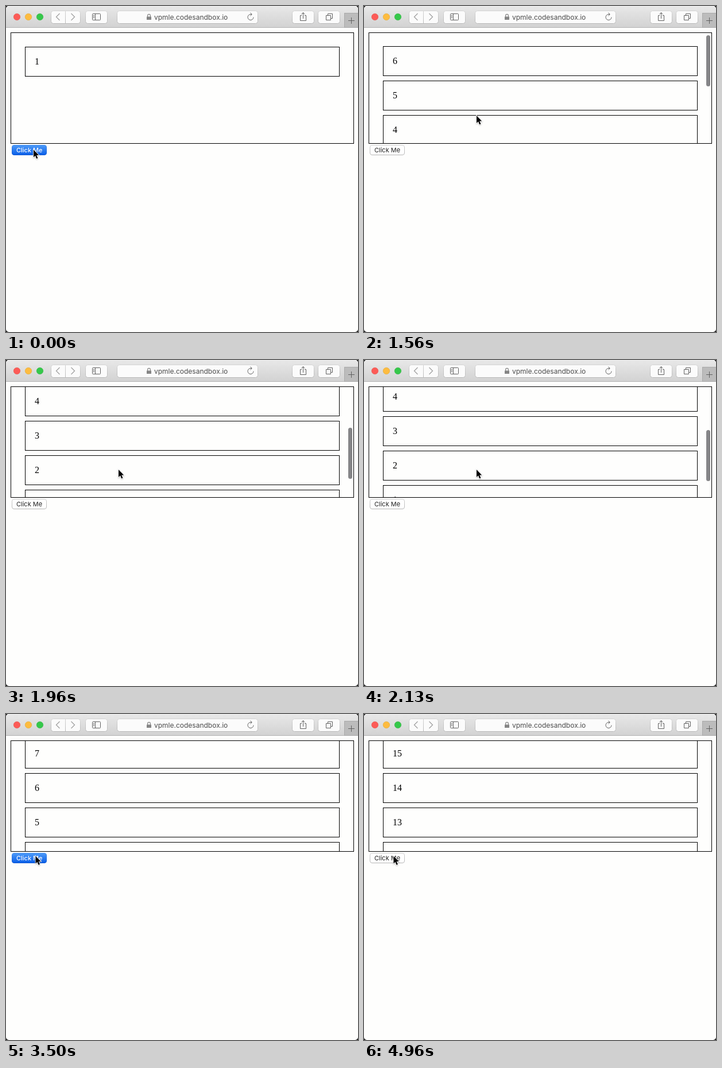
These frames come from a looping animation (613 by 568 pixels, 5.66 s). An HTML page:

```html
<!DOCTYPE html>
<html lang="en">
<head>
<meta charset="utf-8">
<title>Prepending list items</title>
<style>
  html, body { margin: 0; width: 100%; height: 100%; overflow: hidden; background: #111; }
  svg { display: block; width: 613px; height: 568px; }
  .ui { font-family: Inter, sans-serif; }
  .tool { fill: #fbfbfb; stroke: url(#toolEdge); }
  .icon { fill: none; stroke: #606060; }
  .line { fill: none; stroke: #000; }
  #items { font: 16px "Liberation Serif", serif; }
  #button rect { fill: #fff; stroke: url(#buttonEdge); }
  #button text { font-size: 11px; fill: #222; }
  #button.down rect { fill: url(#blue); stroke: url(#blueEdge); }
  #button.down text { fill: #fff; font-weight: 500; }
  #cursor { filter: drop-shadow(0 1px 1px #0004); }
</style>
</head>
<body>
<svg viewBox="0 0 613 568">
  <defs>
    <linearGradient id="bar" x2="0" y2="1">
      <stop stop-color="#e8e8e8"/><stop offset="1" stop-color="#d2d2d2"/>
    </linearGradient>
    <linearGradient id="toolEdge" gradientUnits="userSpaceOnUse" x1="0" x2="0" y1="8" y2="31">
      <stop stop-color="#d4d4d4"/><stop offset="1" stop-color="#b8b8b8"/>
    </linearGradient>
    <linearGradient id="buttonEdge" x2="0" y2="1">
      <stop stop-color="#d0d0d0"/><stop offset="1" stop-color="#b6b6b6"/>
    </linearGradient>
    <linearGradient id="blue" x2="0" y2="1">
      <stop stop-color="#4d9af8"/><stop offset="1" stop-color="#0b5fe8"/>
    </linearGradient>
    <linearGradient id="blueEdge" x2="0" y2="1">
      <stop stop-color="#4390f2"/><stop offset="1" stop-color="#0a55d4"/>
    </linearGradient>
    <clipPath id="window"><rect width="613" height="568" rx="5"/></clipPath>
    <clipPath id="view"><rect x="9" y="47" width="596" height="192"/></clipPath>
  </defs>

  <g clip-path="url(#window)">
    <rect width="613" height="568" fill="#fefefd"/>
    <rect width="613" height="38" fill="url(#bar)"/>
    <path d="M0 .5H613" stroke="#f2f2f2"/>
    <path d="M0 37.5H613" stroke="#b4b4b4"/>
    <rect x="589" y="12" width="24" height="26" fill="#bcbcbc"/>
    <path d="M589.5 12V38M589 12.5H613M589 37.5H613" stroke="#a9a9a9"/>
    <path class="icon" d="M596 25.5H607M601.5 20V31"/>

    <circle cx="19" cy="19" r="5.75" fill="#fc5b57" stroke="#e2463f" stroke-width=".5"/>
    <circle cx="39" cy="19" r="5.75" fill="#fdbc40" stroke="#dfa023" stroke-width=".5"/>
    <circle cx="59" cy="19" r="5.75" fill="#36c84b" stroke="#27aa35" stroke-width=".5"/>

    <g class="tool">
      <rect x="78.5" y="8.5" width="51" height="22" rx="4"/>
      <path d="M103.5 8V31"/>
      <rect x="138.5" y="8.5" width="38" height="22" rx="4"/>
      <rect x="193.5" y="8.5" width="245" height="22" rx="4"/>
      <rect x="498.5" y="8.5" width="38" height="22" rx="4"/>
      <rect x="543.5" y="8.5" width="38" height="22" rx="4"/>
    </g>
    <path class="icon" style="stroke:#a2a2a2" stroke-width="1.3" d="M93.5 13 87.5 19 93.5 25M113.5 13 119.5 19 113.5 25"/>
    <g class="icon">
      <rect x="150.5" y="13.5" width="14" height="11" rx="1"/>
      <path d="M155.5 13.5V24.5M152 16.5H154M152 18.5H154M152 20.5H154"/>
      <path d="M515 16.5H512.5V25.5H522.5V16.5H520M517.5 22V11.5M514.5 14.5 517.5 11.5 520.5 14.5"/>
      <path d="M557.5 16.5H565.5V24.5H557.5ZM560.5 16V13.5H568.5V21.5H566"/>
      <path d="M431 19.5A5 5 0 1 1 426 14.5H428M425.5 11.8 428.3 14.5 425.5 17.2"/>
    </g>
    <path d="M245 18.5H253V24H245Z" fill="#858585"/>
    <path d="M246.6 19V16.8A2.4 2.4 0 0 1 251.4 16.8V19" fill="none" stroke="#858585" stroke-width="1.2"/>
    <text class="ui" x="258" y="24" font-size="12" fill="#4c4c4c">vpmle.codesandbox.io</text>

    <g clip-path="url(#view)">
      <g id="items"></g>
      <rect id="thumb" x="596" width="7" rx="3.5" fill="#868688"/>
    </g>
    <rect class="line" x="8.5" y="46.5" width="597" height="193"/>

    <g id="button" class="ui">
      <rect x="10.5" y="242.5" width="60" height="17" rx="3.5"/>
      <text x="18" y="255">Click Me</text>
    </g>
    <path id="cursor" d="M0 0V13L3 10.2 5.2 15.5 7.4 14.5 5.2 9.5H9.2Z" stroke="#fff" stroke-width="1.6" paint-order="stroke"/>
  </g>
</svg>

<script>
const LOOP = 5660, MAX_ITEMS = 17, PITCH = 60;
const [items, thumb, button, cursor] =
  ["items", "thumb", "button", "cursor"].map(id => document.getElementById(id));

// Runs of clicks; each release prepends an item
const clicks = [
  { start: 0, times: 1, period: 200, hold: 130 },
  { start: 300, times: 4, period: 200, hold: 100 },
  { start: 2900, times: 7, period: 200, hold: 100 },
  { start: 4300, times: 2, period: 160, hold: 100 },
  { start: 4700, times: 2, period: 170, hold: 90 }
].flatMap(({ start, times, period, hold }) =>
  Array.from({ length: times }, (_, i) => {
    const down = start + i * period;
    return { down, up: down + hold };
  }));

const progress = (t, from, to) => Math.min(1, Math.max(0, (t - from) / (to - from)));
// Quick start, long soft landing
const ease = p => 1 - (1 - p) ** 3 * (1 + 3 * p);

items.innerHTML = Array.from({ length: MAX_ITEMS }, (_, i) => `
  <g transform="translate(33 ${71 + i * PITCH})">
    <rect class="line" x=".5" y=".5" width="547" height="51"/>
    <text x="17" y="31"></text>
  </g>`).join("");

function drawList(t) {
  const count = 1 + clicks.filter(({ up }) => t >= up).length;
  const scroll = Math.round(
    153 * ease(progress(t, 1545, 2100)) - 5 * ease(progress(t, 2170, 2230)));
  [...items.children].forEach((item, i) => {
    item.style.display = i < count ? "" : "none";
    item.lastElementChild.textContent = count - i;
  });
  items.setAttribute("transform", `translate(0 ${-scroll})`);

  const scale = 186 / (40 + PITCH * count);
  thumb.setAttribute("y", Math.round(50.5 + scroll * scale));
  thumb.setAttribute("height", Math.round(192 * scale));
  thumb.setAttribute("opacity", progress(t, 1530, 1560) - progress(t, 3220, 3390));
}

function drawCursor(t) {
  const out = ease(progress(t, 1200, 1360));
  const p = progress(t, 2410, 2900), back = ease(p);
  const x = 48 + 148 * out - 144.5 * back;
  const y = 250.5 - 59.5 * out + 56.5 * back + 12 * Math.sin(Math.PI * p);
  cursor.setAttribute("transform", `translate(${x} ${y})`);
}

function tick() {
  const t = performance.now() % LOOP;
  drawList(t);
  drawCursor(t);
  button.classList.toggle("down", clicks.some(({ down, up }) => t >= down && t < up));
  requestAnimationFrame(tick);
}
tick();
</script>
</body>
</html>
```
